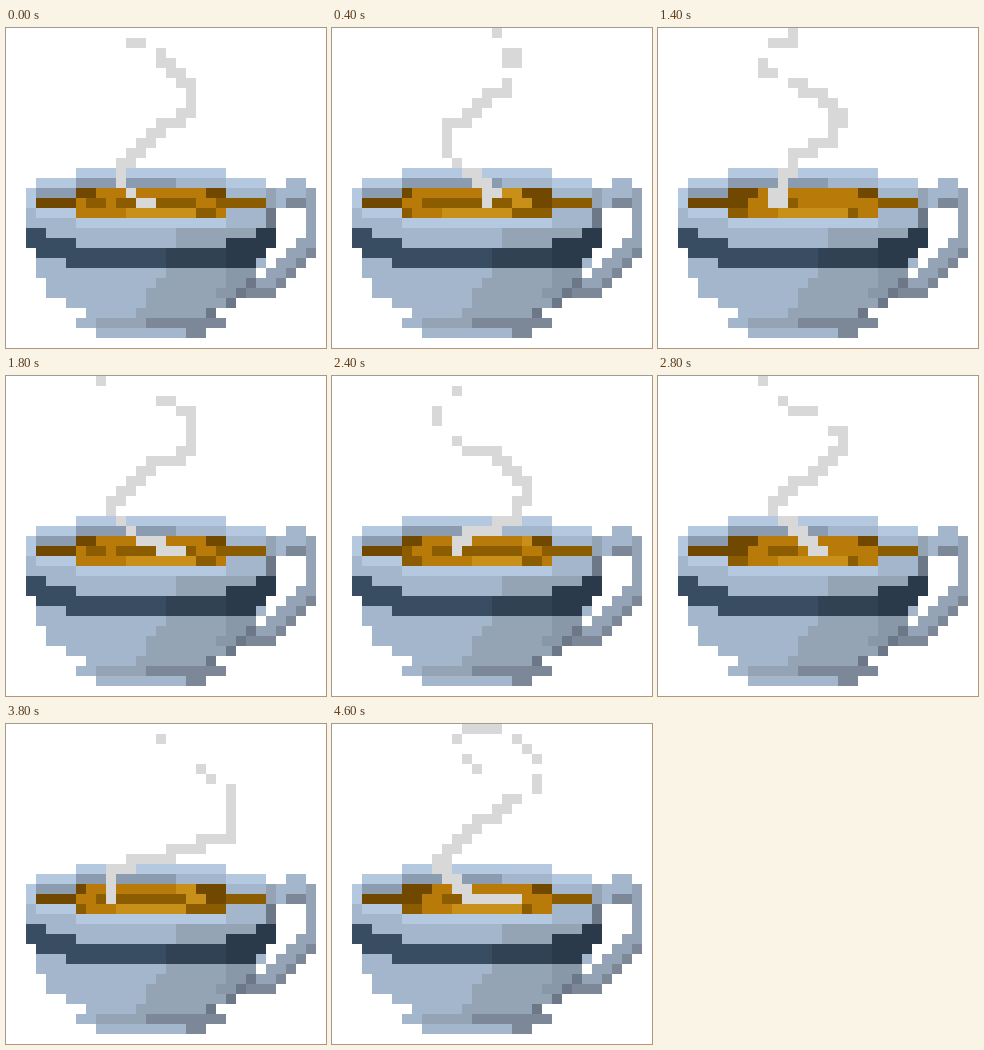
Write an HTML page that moves like this. It is 320 px wide and 320 px high and loops after 4.8 s.

```html
<!DOCTYPE html>
<html lang="en">
<head>
<meta charset="utf-8">
<title>Steaming cup</title>
<style>
html, body { margin: 0; width: 100%; height: 100%; overflow: hidden; background: #fff; }
svg { display: block; width: 100vw; height: 100vh; }
</style>
</head>
<body>
<svg viewBox="0 0 32 32" shape-rendering="crispEdges">
  <g id="handle">
    <path fill="#a4b6cc" d="M28 15H30V16H31V17H28V18H27V16H28Z"/>
    <path fill="#94a4b6" d="M30 16H31V23H30V24H29V25H28V26H27V27H23V26H24V25H26V24H27V23H28V22H29V21H30Z"/>
    <path fill="#7c8898" d="M28 17H30V18H28ZM30 22H31V23H30ZM29 23H30V24H29ZM28 24H29V25H28ZM27 25H28V26H27ZM23 26H27V27H23Z"/>
  </g>
  <g id="cup">
    <path fill="#a4b6cc" d="M3 15H26V16H27V22H26V24H25V26H23V27H22V28H21V29H22V30H20V31H9V30H7V29H8V28H6V27H4V25H3V22H2V16H3Z"/>
    <path fill="#94a4b4" d="M17 20H25V21H22V22H17ZM16 24H25V26H23V27H22V28H21V29H22V30H9V29H13V28H14V26H15V25H16ZM26 16H27V18H26Z"/>
    <path fill="#8898a8" d="M22 24H25V26H23V27H21V26H22Z"/>
    <path fill="#7c8898" d="M14 29H22V30H14ZM18 30H20V31H18Z"/>
    <path fill="#6c7888" d="M26 18H27V20H26ZM25 23H26V25H24V26H23V27H24V26H25V25H26V23ZM22 27H23V28H22ZM20 28H21V29H20Z"/>
    <path fill="#b4c8e0" d="M7 14H22V15H26V16H22V15H7V16H3V18H2V16H3V15H7ZM3 18H22V20H7V19H3Z"/>
    <path fill="#8c9cb0" d="M7 15H17V16H7V17H3V16H7Z"/>
    <path fill="#704800" d="M3 17H7V18H3Z"/>
    <path fill="#8c5c00" d="M22 17H26V18H22Z"/>
    <path fill="#384c62" d="M2 20H4V21H7V22H16V24H6V23H3V22H2Z"/>
    <path fill="#304254" d="M16 22H22V24H16Z"/>
    <path fill="#2a3a4a" d="M25 20H27V22H26V23H25V24H22V21H25Z"/>
  </g>
  <path fill="#b87a08" d="M7 16h15v3h-15z"/>
  <g id="coffee" fill="none" stroke-width="1" transform="translate(0 .5)">
    <path stroke="#704800"/>
    <path stroke="#8c5c00"/>
    <path stroke="#c89018"/>
  </g>
  <path id="plume" fill="#d8d8d8"/>
</svg>
<script>
const LOOP = 4800, STEP = 200, ROOT = 17;

// Horizontal streaks on the coffee: dark, medium, light
const ripples = [
  ["M7 16h2M20 16h2", "M8 17h2M11 17h8M21 17h1M19 18h2", "M12 18h7"],
  ["M7 16h1M19 16h3M20 17h2", "M9 17h9M7 18h1M18 18h4", "M17 16h2M18 17h2M11 18h7"],
  ["M7 16h2M20 16h2", "M7 17h1M10 17h9M21 17h1M7 18h2M19 18h2", "M19 16h1M14 18h5"],
  ["M7 16h3M7 17h2M20 16h2", "M11 17h3M7 18h2M19 18h1", "M12 18h7"]
];

// Plume poses from the surface upwards; | opens a gap, rise is the drift to the next pose
const pose = (step, rise, path) => ({
  step, rise,
  parts: path.split("|").map(part => part.trim().split(" ").map(p => p.split(",").map(Number)))
});
const poses = [
  pose(0, 6, "14,17 13,17 11,15 11,13 14,10 18,8 18,6 15,2|13,1 12,1"),
  pose(4, 8.5, "13,17 14,16 16,16 17,13 13,11 10,8 10,7 12,6 16,3|16,1 15,0"),
  pose(9, 9, "17,17 13,16 10,13 13,9 18,7 18,3 15,2|9,0"),
  pose(12, 8, "12,17 12,16 17,14 18,13 19,11 18,9 15,7 13,7|12,6|10,4 10,3|12,1"),
  pose(16, 6, "17,17 19,16 19,13 10,9 10,8 12,5|14,4|16,3|18,1"),
  pose(19, 3, "10,17 10,14 14,13 21,11 22,10 22,6|20,5|19,4|15,1"),
  pose(23, 0, "18,17 14,17 10,14 13,10 18,7|20,6 20,5|20,3|19,2 18,1|16,0 13,0|12,1|13,3|14,4")
];

const mix = (a, b, u) => a + (b - a) * u;

function markLine(cells, [x0, y0], [x1, y1]) {
  const n = Math.ceil(8 * Math.max(Math.abs(x1 - x0), Math.abs(y1 - y0), .1));
  for (let i = 0; i <= n; i++) {
    cells.add(Math.round(mix(x0, x1, i / n)) + " " + Math.round(mix(y0, y1, i / n)));
  }
}

function centreAt({ parts }, y) {
  const points = parts.flat();
  if (y >= ROOT) return points[0][0];
  for (let i = 1; i < points.length; i++) {
    const [x0, y0] = points[i - 1], [x1, y1] = points[i];
    if (y <= y0 && y >= y1 && y0 > y1) return mix(x0, x1, (y0 - y) / (y0 - y1));
  }
  return null;
}

function plumeCells(step) {
  const cells = new Set();
  const index = poses.findLastIndex(p => p.step <= step);
  const from = poses[index], to = poses[index + 1];
  if (from.step === step) {
    for (const part of from.parts) {
      part.forEach((p, i) => markLine(cells, part[Math.max(0, i - 1)], p));
    }
    return cells;
  }
  const u = (step - from.step) / (to.step - from.step);
  let last = null;
  for (let y = ROOT; y >= 0; y -= .25) {
    const a = centreAt(from, y + from.rise * u);
    const b = centreAt(to, y - from.rise * (1 - u));
    if (a === null && b === null) break;
    const point = [a === null ? b : b === null ? a : mix(a, b, u), y];
    const faded = y < 5 && (Math.round(y) + step) % 3 === 0;
    if (!faded) markLine(cells, last || point, point);
    last = faded ? null : point;
  }
  return cells;
}

const plume = document.getElementById("plume");
const streaks = document.querySelectorAll("#coffee path");
let shown = -1;

function render(time) {
  const step = Math.floor(time % LOOP / STEP);
  if (step === shown) return;
  shown = step;
  ripples[(step >> 1) % ripples.length].forEach((d, i) => streaks[i].setAttribute("d", d));
  plume.setAttribute("d", [...plumeCells(step)].map(c => `M${c}h1v1h-1z`).join(""));
}

const start = performance.now();
function tick() {
  render(performance.now() - start);
  requestAnimationFrame(tick);
}
tick();
</script>
</body>
</html>
```
